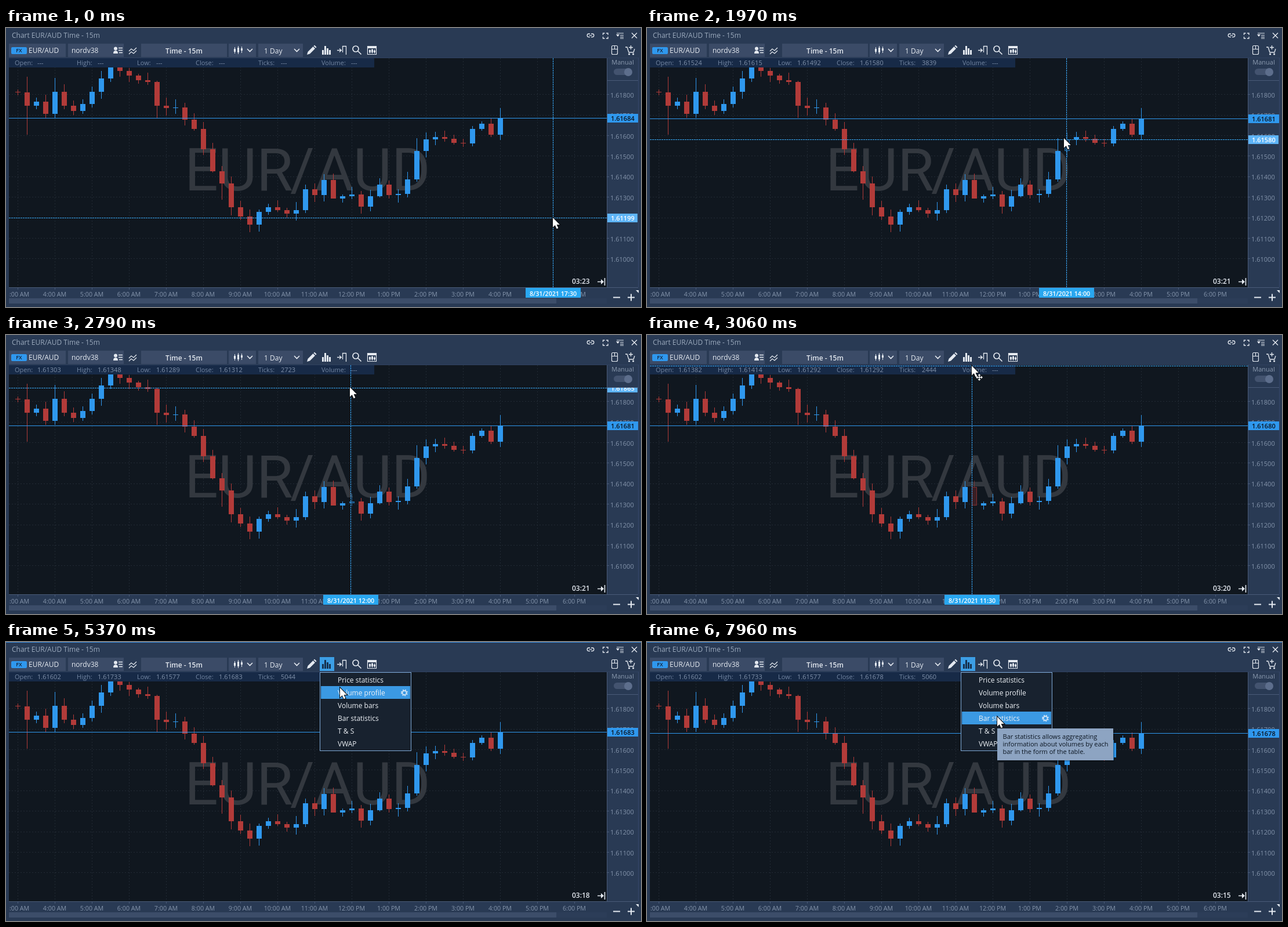
An HTML page with a canvas that plays this animation: 1095x481 px, repeating every 8000 ms.

```html
<!DOCTYPE html>
<html>
<head>
<meta charset="utf-8">
<title>Chart</title>
<style>
html, body { margin: 0; width: 100%; height: 100%; overflow: hidden; background: #293a54; }
canvas { display: block; }
</style>
</head>
<body>
<canvas id="stage" width="1095" height="481"></canvas>
<script>
const g = document.getElementById('stage').getContext('2d');
const LOOP = 8000, LAST = 52, LAG = 7, SECOND = 985;
const BLUE = '#2f98ee', RED = '#b23b39', CROSS = '#38a9fb', PANEL = '#293a54', BUTTON = '#3b4b67',
  GRID = '#222a34', LIGHT = '#e4e9f0', MUTED = '#8494ab', EDGE = '#4a5b78';

// Closing heights; each bar opens where the one before closed.
const closes = [111, 134, 127, 148, 110, 134, 143, 131, 110, 87, 66, 74, 82, 90, 93, 134, 138, 137,
  158, 174, 209, 247, 268, 309, 325, 339, 317, 309, 314, 320, 314, 278, 288, 262.2, 294, 290,
  287, 307.5, 290.2, 270, 288, 286, 261, 212, 192, 188, 191, 198, 199, 174, 165, 184.3];
// High and low of the bars that stand out; the other wicks are random.
const extremes = { 1: [84, 184], 4: [86, 155], 15: [91, 155], 22: [238, 296],
  34: [250.9, 294], 38: [278.5, 316.4], 43: [190, 265], 52: [137.9, 193.1] };
const secondPrices = [84, 83, 81, 80, 82, 83, 83, 80, 78];
const path = [[0, 943, 327], [1590, 943, 327], [1730, 859, 280], [2120, 632, 134], [2480, 632, 134],
  [3050, 560, 54], [3180, 552, 37], [4980, 552, 37], [5840, 604, 129], [LOOP, 604, 129]];

const priceAt = y => (1.618 - (y - 114.17) / 35410).toFixed(5);
const yOf = p => 114.17 + (1.618 - p) * 35410;
const rand = n => (Math.sin(n * 127.1 + 3) * 43758.5453 % 1 + 1) % 1;

function barAt(k, lastY) {
  const open = k ? closes[k - 1] : 110, close = k < LAST ? closes[k] : lastY;
  const top = Math.min(open, close), bottom = Math.max(open, close);
  const [high, low] = extremes[k] || [top - 2 - 12 * rand(k), bottom + 2 + 12 * rand(k + 99)];
  return { open, close, top, bottom, high, low };
}

function ticksAt(bar, t) {
  if (bar < LAST) return Math.round(2444 + 139.5 * (bar - 34));
  const u = (t - 4400) / 1780;
  return Math.floor(5040.1 + 8.45 * u + 0.85 * u * u);
}

function mouseAt(t) {
  t = Math.max(0, t);
  const i = path.findIndex(p => p[0] > t);
  const [t0, x0, y0] = path[i - 1], [t1, x1, y1] = path[i], u = (t - t0) / (t1 - t0);
  return [x0 + (x1 - x0) * u, y0 + (y1 - y0) * u];
}

function rect(x, y, w, h, color) {
  g.fillStyle = color;
  g.fillRect(x, y, w, h);
}
function pill(x, y, w, h, r, color) {
  g.fillStyle = color;
  g.beginPath();
  g.roundRect(x, y, w, h, r);
  g.fill();
}
// y is the middle of the capitals
function text(s, x, y, color, size = 12, weight = 400, align = 'left') {
  g.font = `${weight} ${size}px "Open Sans", sans-serif`;
  g.textAlign = align;
  g.fillStyle = color;
  g.fillText(s, x, y + Math.round(size * 0.36));
}
function line(d, color = LIGHT, width = 1.4, dash = []) {
  g.strokeStyle = color;
  g.lineWidth = width;
  g.setLineDash(dash);
  g.stroke(new Path2D(d));
  g.setLineDash([]);
}
function shape(d, color = LIGHT) {
  g.fillStyle = color;
  g.fill(new Path2D(d));
}
const hDash = (y, color, dash) => line(`M5 ${y + .5}H1036`, color, 1, dash);
const vDash = (x, color, dash) => line(`M${x + .5} 52V447`, color, 1, dash);

function drawPlot(hover, lineY) {
  rect(5, 51, 1031, 396, '#10171f');
  for (let i = 0; i < 9; i++) hDash(Math.round(yOf(1.618 - i / 1000)), GRID, [2, 3]);
  for (let x = 20; x < 1036; x += 64) vDash(x, GRID, [2, 3]);

  g.font = '400 102px Roboto, sans-serif';
  g.textAlign = 'left';
  g.fillStyle = '#33383f';
  g.fillText('EUR', 308, 280);
  g.fillText('/', 490, 280);
  g.fillText('AUD', 533, 280);

  for (let k = 0; k <= LAST; k++) {
    const x = 20 + 16 * k, bar = barAt(k, lineY), color = bar.close < bar.open ? BLUE : RED;
    const top = Math.round(bar.top), h = Math.max(1, Math.round(bar.bottom) - top);
    const high = Math.round(bar.high), low = Math.round(bar.low);
    if (k === hover) {
      g.globalAlpha = 0.5;
      rect(x, high, 1, top - high, color);
      rect(x, top + h, 1, low - top - h, color);
      g.globalAlpha = 0.25;
      rect(x - 4, top, 9, h, color);
      g.globalAlpha = 0.6;
      line(`M${x - 3.5} ${top + .5}h8v${h - 1}h-8z`, color, 1);
      g.globalAlpha = 1;
    } else {
      rect(x, high, 1, low - high, color);
      rect(x - 4, top, 9, h, color);
    }
  }
}

function drawInfo(k, price, t) {
  rect(5, 52, 630, 16, '#172a47');
  let values = [];
  if (k <= LAST) {
    const bar = barAt(k, yOf(price));
    values = [bar.open, bar.high, bar.low, bar.close].map(priceAt);
    values.push(ticksAt(k, t));
  }
  [['Open:', 15, 54], ['High:', 122, 158], ['Low:', 226, 259], ['Close:', 327, 367],
    ['Ticks:', 435, 474], ['Volume:', 544, 595]].forEach(([name, x, valueX], i) => {
    text(name, x, 60, '#7386a2', 11);
    text(values[i] ?? '---', valueX, 60, '#8091aa', 11);
  });
}

function drawPriceAxis(lineY, price, cross) {
  rect(1036, 51, 59, 430, PANEL);
  rect(1036, 51, 1, 397, EDGE);
  rect(1090, 51, 1, 397, '#35476a');
  for (let i = 0; i < 9; i++) {
    const p = 1.618 - i / 1000, y = yOf(p);
    rect(1037, Math.round(y), 3, 1, EDGE);
    text(p.toFixed(5), 1042, Math.round(y + 1.6), MUTED, 11);
  }
  rect(1037, lineY - 7, 53, 15, BLUE);
  text(price, 1043, lineY + 1, '#0b1420', 11, 600);
  if (cross) {
    rect(1037, cross[1] - 7, 52, 15, '#5eb4f8');
    text(priceAt(cross[1]), 1043, cross[1] + 1, '#fff', 11, 600);
  }
  rect(1037, 51, 53, 39, PANEL);
  rect(1037, 90, 53, 1, EDGE);
  text('Manual', 1063.5, 59, '#8c9bb0', 11, 400, 'center');
  pill(1048, 70, 30, 11, 5.5, '#43536f');
  pill(1066, 69, 14, 14, 7, '#5d6e8c');
}

function drawTimeAxis(t, cross) {
  rect(0, 447, 1095, 34, PANEL);
  rect(5, 447, 1085, 1, EDGE);
  g.save();
  g.beginPath();
  g.rect(5, 448, 1031, 18);
  g.clip();
  for (let i = 0; i < 16; i++) {
    const x = 20 + 64 * i, hour = (i + 2) % 12 + 1;
    rect(x, 448, 1, 3, EDGE);
    text(`${hour}:00 ${i < 9 ? 'AM' : 'PM'}`, x, 459, MUTED, 10.7, 400, 'center');
  }
  g.restore();
  if (cross) {
    const min = 960 + 15 * Math.round((cross[0] - 852) / 16);
    const label = `8/31/2021 ${Math.floor(min / 60)}:${String(min % 60).padStart(2, '0')}`;
    rect(cross[0] - 47, 448, 95, 17, '#29a7f0');
    text(label, cross[0] + .5, 458, '#fff', 10.7, 600, 'center');
  }
  rect(5, 466, 1031, 9, '#2c3d58');
  rect(5, 466, 944, 9, '#3c4d69');
  line('M1047 464.5h12M1072 464.5h12M1078 458.5v12', LIGHT, 2);
  shape('M1086 452h5v5z');
  text('03:' + (23 - Math.floor(t / SECOND)), 976, 437, LIGHT, 12, 600);
  line('M1020 437.5h9M1032.5 431v13', LIGHT, 1.6);
  shape('M1026 433l5 4.5l-5 4.5z');
}

function drawToolbar(active, open) {
  rect(0, 0, 1095, 51, PANEL);
  rect(0, 51, 5, 430, PANEL);
  rect(5, 51, 1085, 1, '#2f415f');
  text('Chart EUR/AUD Time - 15m', 10, 13, '#9baabd');
  [[5, 98], [107, 96], [233, 148], [384, 47], [435, 77]].forEach(([x, w]) => rect(x, 27, w, 23, BUTTON));
  pill(9, 33, 27, 12, 2, BLUE);
  text('FX', 22.5, 39, '#14233a', 9, 600, 'center');
  text('EUR/AUD', 39, 39, LIGHT, 12, 500);
  text('nordv38', 113, 39, LIGHT, 12, 500);
  text('Time - 15m', 307, 40, LIGHT, 12, 600, 'center');
  text('1 Day', 445, 40, LIGHT, 12, 500);

  // account and trend
  shape('M185 44q0-5 4-5q4 0 4 5zM186 35.5a3 3 0 1 0 6 0a3 3 0 1 0-6 0');
  line('M194 34.5h7M194 38.5h7M195 42.5h6', LIGHT, 1.5);
  line('M212 40l4-4l4 3l5-5M212 45l4-4l4 3l5-5', LIGHT, 1.3);
  // candle style and chevrons
  line('M394.5 33v11M400.5 31v14M406.5 32v11', LIGHT, 1);
  shape('M393 36h3v5h-3zM399 34h3v8h-3zM405 35h3v4h-3z');
  line('M416 36l4.5 4.5l4.5-4.5M497 36l4.5 4.5l4.5-4.5', LIGHT, 1.6);
  // drawing, analysis, levels, search, table
  shape('M519 46l1.5-5l9-9l3.5 3.5l-9 9zM530.5 31l1.5-1.5l3.5 3.5l-1.5 1.5z');
  if (active) rect(541, 26, 25, 24, '#3c9ee5');
  shape('M545 38h3v8h-3zM549 31h3v15h-3zM553 35h3v11h-3zM557 38h3v8h-3z', open ? '#16304d' : LIGHT);
  line('M571 38.5h8M575 35.5l3 3l-3 3M580.5 42v-10.5h6v14.5', LIGHT, 1.3);
  line('M598 36a5 5 0 1 0 10 0a5 5 0 1 0-10 0M607 40l5.5 5.5', LIGHT, 1.7);
  line('M623.5 31.5h15v14h-15zM627.5 37v7M631.5 36v8M635.5 37v7', LIGHT, 1.2);
  shape('M623 31h16v4h-16zM626 38h3v4h-3zM630 37h3v5h-3zM634 39h3v3h-3z');
  // window buttons, mouse and cart
  line('M1007 10h-2a2.8 2.8 0 0 0 0 5.6h2M1009 10h2a2.8 2.8 0 0 1 0 5.6h-2M1005.5 12.8h5', LIGHT, 1.3);
  line('M1029.5 12v-3h3M1035 9h3v3M1038 15v3h-3M1032.5 18h-3v-3', LIGHT, 1.3);
  line('M1053 9h12M1059 12.5h6M1059 15.5h6M1059 18h6', LIGHT, 1.2);
  shape('M1052 11h6l-3 4z');
  line('M1079 8.5l9 9M1088 8.5l-9 9');
  line('M1046.5 30.5h6q2 0 2 2v11q0 2-2 2h-6q-2 0-2-2v-11q0-2 2-2M1044.5 36.5h10M1049.5 31v6', LIGHT, 1.2);
  line('M1068 33h3l3 9h8l2-6M1077.5 30v7M1074 33.5h7', LIGHT, 1.3);
  pill(1073, 43.4, 3.2, 3.2, 1.6, LIGHT);
  pill(1080, 43.4, 3.2, 3.2, 1.6, LIGHT);
}

function drawMenu(alpha, my) {
  g.globalAlpha = alpha;
  rect(0, 0, 1095, 1, '#3f8fe0');
  rect(541, 52, 158, 136, '#7fa9d6');
  rect(542, 53, 156, 134, '#18222f');
  const row = Math.floor((my - 54) / 22);
  ['Price statistics', 'Volume profile', 'Volume bars', 'Bar statistics', 'T & S', 'VWAP'].forEach((item, i) => {
    const y = 54 + 22 * i;
    if (i === row) {
      rect(543, y, 154, 22, '#3b99e3');
      line(`M683.5 ${y + 11.5}a3.5 3.5 0 1 0 7 0a3.5 3.5 0 1 0-7 0`, '#cfe3f6', 1.8);
      line(`M682 ${y + 11.5}a5 5 0 1 0 10 0a5 5 0 1 0-10 0`, '#cfe3f6', 1.8, [2, 2]);
    }
    text(item, 572, y + 12, '#edf1f6', 12, 500);
  });
  g.globalAlpha = 1;
}

function drawTooltip(x, y, w, h, textY, lines) {
  rect(x + 2, y + 2, w, h, 'rgba(0,0,0,.25)');
  rect(x, y, w, h, '#8da4c2');
  lines.forEach((s, i) => text(s, x + 9.5, textY + 13 * i, '#0c1622', 11));
}

function drawCursor(x, y, moving) {
  g.save();
  g.translate(Math.round(x + .4), Math.round(y));
  const arrow = 'M0 0v16.5l3.8-3.6l2.8 6.3l2.8-1.2l-2.8-6.1h5.2z';
  line(arrow, '#0a0d12', 2);
  shape(arrow, '#fff');
  if (moving) {
    line('M9 20h8M13 16v8', '#fff');
    shape('M13 14l2.5 3h-5zM13 26l2.5-3h-5zM7 20l3-2.5v5zM19 20l-3-2.5v5z', '#fff');
  }
  g.restore();
}

function draw(t) {
  const [mx, my] = mouseAt(t);
  const lagged = mouseAt(t - LAG).map(Math.round);
  const cross = lagged[1] > 51 && t < 4000 ? lagged : null;
  const bar = cross ? Math.round((cross[0] - 20) / 16) : LAST;
  const price = '1.616' + secondPrices[Math.floor(t / SECOND)];
  const lineY = Math.floor(yOf(price));
  const open = t >= 4430;

  drawPlot(cross ? bar : -1, lineY);
  drawInfo(bar, price, t);
  rect(5, lineY, 1031, 1, BLUE);
  if (cross) {
    hDash(cross[1], CROSS, [3, 1]);
    vDash(cross[0], CROSS, [3, 1]);
  }
  drawPriceAxis(lineY, price, cross);
  drawTimeAxis(t, cross);
  drawToolbar(open || (mx > 541 && mx < 566 && my < 50), open);
  if (open) drawMenu(Math.min(1, (t - 4400) / 180), my);
  if (t >= 3420 && !open) {
    drawTooltip(491, 0, 124, 20, 9, ['List of analysis tools']);
    shape('M547 20h12l-6 6z', '#8da4c2');
  }
  if (t >= 6180) {
    drawTooltip(604, 149, 200, 55, 163, ['Bar statistics allows aggregating',
      'information about volumes by each', 'bar in the form of the table.']);
  }
  drawCursor(mx, my, cross && my < 68 && mx < 635);
}

const start = performance.now();
function frame() {
  draw((performance.now() - start) % LOOP);
  requestAnimationFrame(frame);
}
frame();
</script>
</body>
</html>
```
